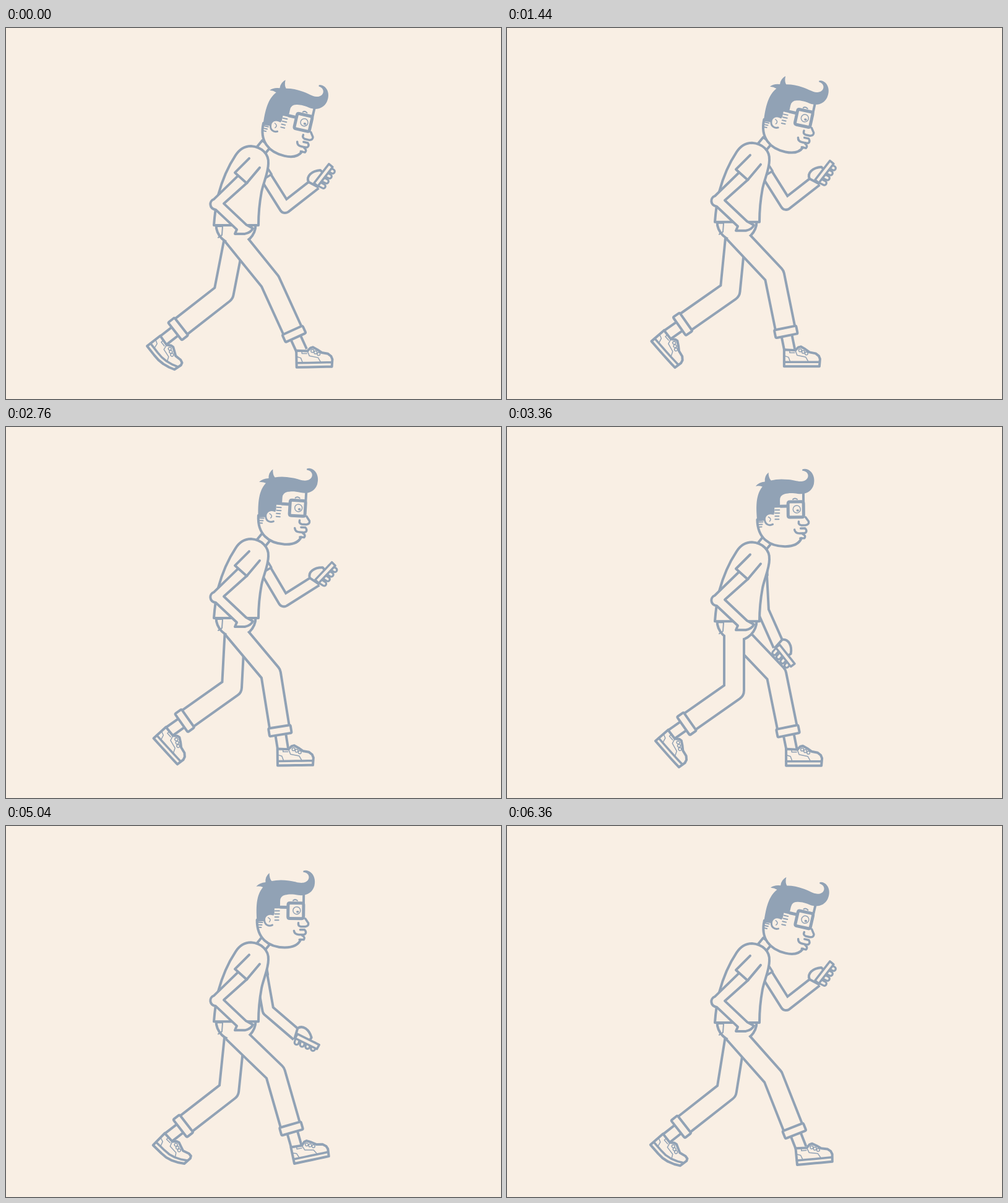
These frames come from a looping animation (800 by 600 pixels, 6400 ms). An HTML page with a canvas:

```html
<!DOCTYPE html>
<html lang="en">
<head>
<meta charset="utf-8">
<title>Walking with a phone</title>
<style>
html, body { margin: 0; height: 100%; overflow: hidden; background: #f9efe4; }
canvas { display: block; }
</style>
</head>
<body>
<canvas id="stage" width="800" height="600"></canvas>
<script>
const g = document.getElementById('stage').getContext('2d');
const INK = '#91a2b5', PAPER = '#f9efe4';
const LOOP = 6400, CYCLE = 1280, STEP = 640, TICK = 40;
const rad = d => d * Math.PI / 180;
const mix = (a, b, k) => a + (b - a) * k;
const bell = (t, mid, width) => Math.exp(-(((t - mid) / width) ** 2));
const ease = (t, a, b) => {
  const k = Math.min(1, Math.max(0, (t - a) / (b - a)));
  return k * k * (3 - 2 * k);
};

// Joint angles at eight even moments of the cycle, from heel strike on
const THIGH = [39, 43.3, 23.5, 7, -4.7, 0, 14, 49];
const SHIN = [24.5, 11.5, -1, -47, -52, -55, -47, 0];
const FOOT = [-1, 0, 0, 32, 52, 49, 38, -16];

// Smooth curve through evenly spaced keys that wrap round
function angle(keys, phase) {
  const n = keys.length, pos = phase / CYCLE * n, i = Math.floor(pos), s = pos - i;
  const [a, b, c, d] = [n - 1, 0, 1, 2].map(o => keys[(i + o) % n]);
  return b + s / 2 * (c - a + s * (2 * a - 5 * b + 4 * c - d + s * (3 * (b - c) + d - a)));
}

function stroke(path, w = 4, color = INK) {
  g.lineWidth = w;
  g.strokeStyle = color;
  g.stroke(path);
}
function fill(path, color = PAPER) {
  g.fillStyle = color;
  g.fill(path);
}
const line = (d, w) => stroke(new Path2D(d), w);
function shape(d, w) {
  const p = new Path2D(d);
  fill(p);
  stroke(p, w);
}
const poly = pts => new Path2D('M' + pts.map(p => p.join()).join('L'));

// Hollow limb; an extra path is merged into its outline
function tube(pts, width, extra, w = 4) {
  const p = poly(pts);
  g.lineCap = 'butt';
  stroke(p, width + w);
  if (extra) stroke(extra, 2 * w);
  stroke(p, width - w, PAPER);
  if (extra) fill(extra);
  g.lineCap = 'round';
}
function within(x, y, deg, draw) {
  g.save();
  g.translate(x, y);
  g.rotate(rad(deg));
  draw();
  g.restore();
}
const reach = ([x, y], len, deg) => [x + len * Math.cos(rad(deg)), y + len * Math.sin(rad(deg))];

function shoe(bend) {
  const curl = x => bend * .011 * Math.max(0, x - 12) ** 2;
  const warp = pts => poly(pts.map(([x, y]) => [x, y - curl(x)]));
  const sole = y => [-9, 10, 20, 30, 40, 48].map(x => [x, y]);
  const body = warp([[-9, -1], ...sole(26), [49, 14], [47, 9], [42, 5], [32, 3],
    [25, -2], [18, -6], [14, -5], [9, 0], [-9, -1]]);
  fill(body);
  stroke(body);
  stroke(warp(sole(19)), 3.5);
  stroke(warp([[-8, 9], [-2, 11], [1, 19]]), 1.5);
  stroke(warp([[9, 0], [12, 8], [26, 11], [30, 18]]), 1.5);
  stroke(warp([[0, 0], [0, 4], [8, 4]]), 1.5);
  for (let i = 0; i < 3; i++) {
    const x = 17 + 5 * i, c = new Path2D();
    c.arc(x, 2.5 * i - curl(x), 2.4, 0, 7);
    stroke(c, 1.5);
  }
}

function leg(x, y, phase, far, hips) {
  const swing = angle(THIGH, phase), thigh = far ? swing * 1.136 - 5.7 : swing;
  const shin = angle(SHIN, phase);
  const hip = [x, y];
  const knee = reach(hip, 95, 90 - thigh);
  const cuff = reach(knee, 90, 90 - shin);
  const ankle = reach(knee, 124, 90 - shin);
  tube([cuff, ankle], 17);
  within(...ankle, angle(FOOT, phase), () => shoe(bell(phase, 580, 130)));
  tube([hip, knee, cuff], 32, hips);
  within(...knee, -shin, () => shape('M-16 87H16Q18 87 18 89V98Q18 100 16 100H-16Q-18 100 -18 98V89Q-18 87 -16 87Z'));
}

function hand(grip) {
  shape('M-11 -3C-15 -12 -6 -21 8 -22L12 -18L4 5Z');
  for (let i = 0; i < 4; i++) {
    const x = 20 - 5 * i, y = 8 * i - 24;
    const finger = poly([[x, y], [x + 8 * grip, y + 4 * grip]]);
    stroke(finger, 10);
    stroke(finger, 3.5, PAPER);
  }
  shape('M-2 -1L22 -32L28 -27L4 4Z', 3.5);
}

function farArm(down, grip) {
  const upper = mix(57.8, 87, down), fore = mix(-38, 66, down);
  const shoulder = [410, 225];
  const elbow = reach(shoulder, 77, upper);
  const wrist = reach(elbow, 62, fore);
  tube([shoulder, elbow, wrist], 18);
  within(...shoulder, upper, () => shape('M0 -10H20V10H0Z', 3.5));
  within(...wrist, fore + 38, () => hand(grip));
}

function torso() {
  line('M342 321H350L349 335L343 339', 2);
  shape('M405 193L414 182L428 192L419 203Z');
  shape('M336 319Q338 292 343 270C350 244 361 221 371 206C378 195 387 191 396 191' +
    'C413 192 425 204 424 219C424 234 416 250 413 265Q408 292 408 319Z');
  shape('M374 240L336 277C328 280 328 292 339 294L373 326L370 333H386Q396 331 399 324L388 318L352 284L390 250');
  shape('M393 211L370 234L389 251L410 226');
}

// Head in its upright pose
function head() {
  fill(new Path2D('M406 120L405 158C407 182 428 195 452 194C466 193 473 187 476 181L482 168L486 159L480 147V105Z'));
  line('M405 150C405 180 424 194 450 194C465 194 473 188 476 181M480 107V122');
  line('M483 147L488 154Q489 159 483 160H476Q471 159 472 154', 3.5);
  line('M465 167Q466 173 473 173H479M475 165H482Q486 169 483 172L478 174Q484 177 481 181H474', 3.5);
  fill(new Path2D('M405 153C403 130 403 110 414 97Q409 95 403 96Q408 90 418 89Q417 80 424 74' +
    'Q424 83 428 87Q440 84 456 86C466 87 471 90 479 89C491 87 491 73 479 72Q477 69 483 69' +
    'C494 70 500 82 497 94C494 105 484 111 471 109C461 107 455 108 450 109Q442 111 442 119V131H433V140' +
    'Q420 139 416 152Z'), INK);
  line('M434 135H441M434 140H441M434 145H440M434 150H440M407 154H414M407 158H413M408 162H412', 2);
  shape('M431 141C421 138 416 145 417 151C418 158 424 161 430 158', 3);
  line('M423 146Q429 149 425 153', 1.5);
  line('M443 129H455', 5);
  shape('M458 122H477Q480 122 480 125V144Q480 147 477 147H458Q455 147 455 144V125Q455 122 458 122Z', 5);
  line('M463 118Q466 115 470 118', 2);
  line('M463 134a6 6 0 1 0 12 0a6 6 0 1 0 -12 0', 1.5);
  line('M470 136h1', 3.5);
}

function draw(t) {
  const phase = t % CYCLE;
  const rise = (phase < STEP ? 27 : 24) * bell(t % STEP, 345, 145);
  const lookUp = ease(t, 2560, 2900) - ease(t, 4960, 5400);
  const armDown = ease(t, 2680, 3240) - ease(t, 4860, 5420);
  const grip = 1 - .6 * (ease(t, 3400, 4200) - ease(t, 4800, 5200));

  g.fillStyle = PAPER;
  g.fillRect(0, 0, 800, 600);
  g.lineJoin = g.lineCap = 'round';

  leg(370, 336 - rise, (phase + STEP) % CYCLE, true);
  within(0, -rise, 0, () => farArm(armDown, grip));
  const hips = new Path2D();
  hips.arc(371.5, 318 - rise, 30, 0, Math.PI);
  hips.closePath();
  leg(367, 336 - rise, phase, false, hips);
  within(0, -rise, 0, torso);
  within(415, 203 - rise * 1.15, 13 * (1 - lookUp) - rise * .14, () => {
    g.translate(-415, -198);
    head();
  });
}

function frame(now) {
  draw(Math.floor((now % LOOP) / TICK) * TICK);
  requestAnimationFrame(frame);
}
draw(0);
requestAnimationFrame(frame);
</script>
</body>
</html>
```
